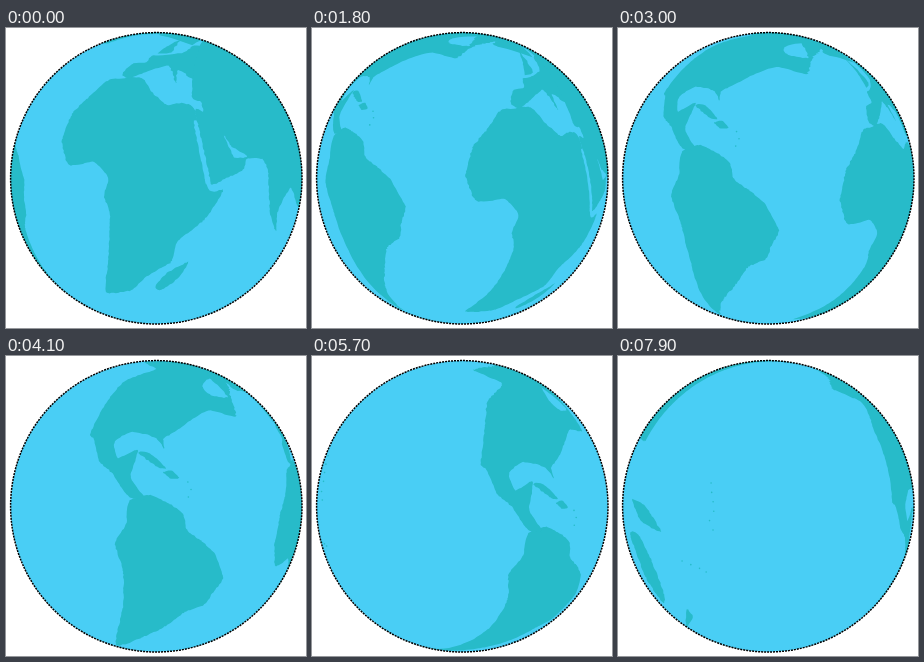
An HTML page with a canvas for the animation above (8000 ms loop, 300 px wide and 300 px high).

```html
<!DOCTYPE html>
<html lang="en">
<head>
<meta charset="utf-8">
<title>Turning globe</title>
<style>
  html, body { margin: 0; width: 100%; height: 100%; overflow: hidden; background: #fff; }
  canvas { display: block; width: 300px; height: 300px; }
</style>
</head>
<body>
<canvas id="globe" width="300" height="300"></canvas>
<script>
const LOOP = 8000, STEP = 100, TURN = 2.5;
const C = 150.3, R = 145.7;
const SEA = '#49cef5', LAND = '#27bbc9';
const RAD = Math.PI / 180;
const ROLL = 19.5 * RAD, cosR = Math.cos(ROLL), sinR = Math.sin(ROLL);
const ctx = document.getElementById('globe').getContext('2d');

let seed = 7;
const random = () => (seed = seed * 16807 % 2147483647) / 2147483647;

// Lift a point of the disc, seen when the globe has turned by `at` degrees, onto the sphere.
function lift([x, y], at) {
  let u = (x - C) / R, v = (C - y) / R;
  const d = Math.hypot(u, v);
  if (d > 1) { u /= d; v /= d; }
  const w = Math.sqrt(Math.max(0, 1 - u * u - v * v));
  const s = u * cosR - v * sinR;
  return { lon: Math.atan2(s, w) - at * RAD, up: u * sinR + v * cosR, ring: Math.hypot(s, w) };
}

function project(p, turn) {
  const s = p.ring * Math.sin(p.lon + turn);
  return {
    x: C + R * (s * cosR + p.up * sinR),
    y: C - R * (p.up * cosR - s * sinR),
    w: p.ring * Math.cos(p.lon + turn)
  };
}

// Cardinal spline between b and c; a low tension keeps capes sharp.
function spline(a, b, c, d, t) {
  const t2 = t * t, t3 = t2 * t, k = 0.3;
  return b * (2 * t3 - 3 * t2 + 1) + c * (3 * t2 - 2 * t3)
    + k * (c - a) * (t3 - 2 * t2 + t) + k * (d - b) * (t3 - t2);
}

// A closed coast through a few key points, slightly ragged.
function coast(at, keys, color = LAND) {
  const pts = keys.split(' ').map(pair => pair.split(',').map(Number));
  const key = i => pts[(i + pts.length) % pts.length];
  const points = pts.flatMap((b, i) => {
    const a = key(i - 1), c = key(i + 1), d = key(i + 2);
    const n = Math.ceil(Math.hypot(c[0] - b[0], c[1] - b[1]) / 2);
    return Array.from({ length: n }, (_, j) => lift(
      [0, 1].map(k => spline(a[k], b[k], c[k], d[k], j / n) + random() - 0.5), at));
  });
  return { points, color };
}

// A row of islets between two points.
function islets(at, [x1, y1], [x2, y2], count) {
  return Array.from({ length: count }, (_, i) => {
    const t = i / (count - 1);
    return lift([x1 + (x2 - x1) * t + random() * 6 - 3, y1 + (y2 - y1) * t], at);
  });
}

const coasts = [
  // Africa and Madagascar
  coast(0, '56,113 66,86 84,68 103,52 136,50 146,64 161,77 174,75 189,83 202,160 217,162 199,191 171,214 165,234 141,248 126,262 100,264 102,235 104,188 98,168 102,150 88,134 63,137'),
  coast(0, '182,234 161,245 149,259 156,262 172,250'),
  // Europe
  coast(45, '199,76 201,62 212,60 211,51 221,48 228,42 222,30 227,25 252,40 275,68 262,80 240,66 246,82 231,62 216,74 208,80'),
  coast(45, '208,24 214,32 221,44 213,47 211,36'),
  // Asia, Arabia and India
  coast(0, '189,84 197,84 195,74 186,70 188,40 199,10 238,26 280,74 299,135 293,180 285,160 272,183 270,203 264,185 262,143 256,131 241,131 237,142 220,150 203,154'),
  // South America
  coast(102.5, '123,145 144,139 164,148 177,158 181,174 194,184 209,198 217,222 207,236 199,248 179,256 160,270 137,281 110,289 117,250 117,215 109,187 120,168'),
  // North America
  coast(122.5, '147,9 180,8 215,18 236,37 254,69 233,65 212,87 200,98 202,109 193,97 168,91 152,101 157,118 177,110 172,138 187,160 170,157 153,134 138,121 129,98 124,91 135,55 145,34 168,20'),
  // Caribbean
  coast(102.5, '132,97 143,97 160,112 152,111'),
  coast(102.5, '157,116 166,115 173,122 164,122'),
  // Greenland
  coast(102.5, '205,12 222,18 245,36 228,33'),
  // New Guinea, Australia, New Zealand
  coast(197.5, '14,143 26,149 34,160 43,176 23,165'),
  coast(197.5, '12,178 20,178 34,206 46,238 45,247 28,222'),
  coast(197.5, '69,253 75,261 68,271'),
  // Red Sea, Persian Gulf, Hudson Bay
  coast(0, '188,96 192,97 205,157 200,156', SEA),
  coast(0, '218,107 225,118 241,128 228,129', SEA),
  coast(102.5, '196,30 204,23 222,41 205,39', SEA)
];

const isles = [
  ...islets(102.5, [184, 126], [184, 141], 3),
  ...islets(197.5, [92, 127], [95, 174], 6),
  ...islets(197.5, [66, 205], [89, 216], 4)
];

const front = p => p.w > 0;
const bearing = p => Math.atan2(p.y - C, p.x - C);

// Hidden stretches of a coast are replaced by the shorter arc of the rim.
function drawCoast({ points, color }, turn) {
  const pts = points.map(p => project(p, turn));
  const first = pts.findIndex(front);
  if (first < 0) return;
  let last = pts[first], gap = false;
  ctx.fillStyle = color;
  ctx.beginPath();
  ctx.moveTo(last.x, last.y);
  for (let i = 1; i <= pts.length; i++) {
    const p = pts[(first + i) % pts.length];
    if (!front(p)) { gap = true; continue; }
    if (gap) {
      const a = bearing(last), b = bearing(p);
      ctx.arc(C, C, R, a, b, Math.sin(b - a) < 0);
    }
    ctx.lineTo(p.x, p.y);
    last = p;
    gap = false;
  }
  ctx.fill();
}

function disc(x, y, r) {
  ctx.beginPath();
  ctx.arc(x, y, r, 0, 2 * Math.PI);
}

function draw(time) {
  const turn = Math.floor(time % LOOP / STEP) * TURN * RAD;
  ctx.clearRect(0, 0, 300, 300);
  ctx.fillStyle = SEA;
  disc(C, C, R);
  ctx.fill();

  coasts.forEach(c => drawCoast(c, turn));

  ctx.fillStyle = LAND;
  isles.map(p => project(p, turn)).filter(front).forEach(p => {
    disc(p.x, p.y, 0.8);
    ctx.fill();
  });

  ctx.lineWidth = 1.5;
  ctx.setLineDash([2, 1]);
  disc(C, C, R);
  ctx.stroke();
}

const start = performance.now();
function tick() {
  draw(performance.now() - start);
  requestAnimationFrame(tick);
}
tick();
</script>
</body>
</html>
```
